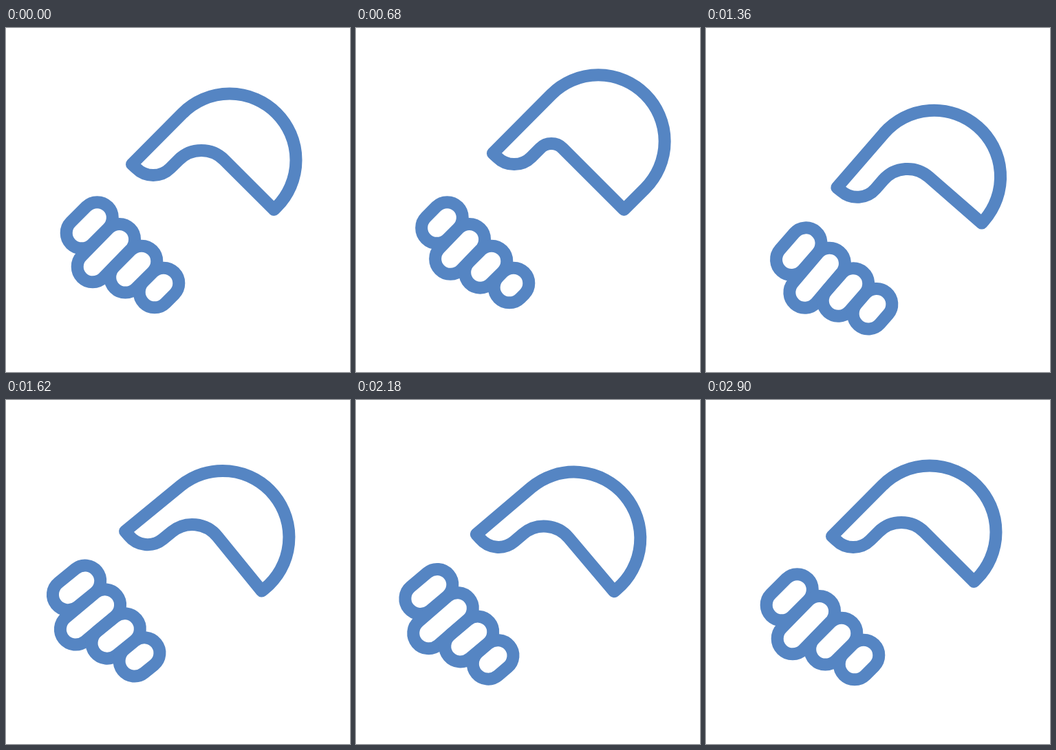
An HTML page with a canvas that plays this animation: 500x500 px, repeating every 3000 ms.

```html
<!DOCTYPE html>
<html lang="en">
<head>
<meta charset="utf-8">
<title>Handshake</title>
<style>
  html, body { margin: 0; width: 100%; height: 100%; overflow: hidden; background: #fff; }
  canvas { display: block; }
</style>
</head>
<body>
<canvas id="stage" width="500" height="500"></canvas>
<script>
const ctx = document.getElementById('stage').getContext('2d');
const LOOP = 3000, Q = Math.PI / 4;

// [time, how far the grip is loosened]
const gripKeys = [[0, 0], [520, 1], [670, 1], [940, 0]];

// [time, tilt in degrees, x, y]
const low = [-6, 16.3, 35.5], high = [6, -16, -1], rest = [0, 0, 0];
const shakeKeys = [
  [940, ...rest], [1275, ...low], [1600, ...high], [1922, ...low],
  [2244, ...high], [2560, ...low], [2895, ...rest]
];

// [upper x, upper y, lower x, lower y, retraction]
const fingers = [
  [132.5, 275.5, 110, 298, 7.5],
  [164.8, 307.2, 126, 347, 11.5],
  [197, 339, 173.5, 362.3, 7],
  [229, 371, 216, 384, 7]
];

const ease = u => u * u * (3 - 2 * u);

function sample(keys, t) {
  const i = keys.findIndex(key => key[0] > t);
  if (i === 0) return keys[0].slice(1);
  if (i < 0) return keys[keys.length - 1].slice(1);
  const a = keys[i - 1], b = keys[i];
  const u = ease((t - a[0]) / (b[0] - a[0]));
  return a.slice(1).map((v, n) => v + (b[n + 1] - v) * u);
}

function drawPalm(p) {
  const back = 27.3 * p, thumb = 16 * p;
  ctx.beginPath();
  ctx.arc(325 + back, 192 - back, 96.5, 5 * Q, Q);
  ctx.lineTo(389.5, 264);
  ctx.arc(284, 225 - 34 * p, 47 - 24 * p, -Q, -3 * Q, true);
  ctx.arc(214 + thumb, 179 - thumb, 35, Q, 3 * Q);
  ctx.lineTo(183 + thumb, 198 - thumb);
  ctx.closePath();
  ctx.stroke();
}

function drawFinger([x1, y1, x2, y2, pull], p) {
  ctx.beginPath();
  ctx.arc(x1, y1, 22.3, -3 * Q, Q);
  ctx.arc(x2 + pull * p, y2 - pull * p, 22.3, Q, 5 * Q);
  ctx.closePath();
  ctx.stroke();
}

function draw(t) {
  const [grip] = sample(gripKeys, t);
  const [tilt, x, y] = sample(shakeKeys, t);
  ctx.clearRect(0, 0, 500, 500);
  ctx.save();
  ctx.translate(250 + x, 250 + y);
  ctx.rotate(tilt * Math.PI / 180);
  ctx.translate(-250, -250);
  ctx.strokeStyle = '#5585c3';
  ctx.lineWidth = 18;
  ctx.lineJoin = 'round';
  drawPalm(grip);
  fingers.forEach(finger => drawFinger(finger, grip));
  ctx.restore();
}

const start = performance.now();
function tick() {
  draw((performance.now() - start) % LOOP);
  requestAnimationFrame(tick);
}
tick();
</script>
</body>
</html>
```
